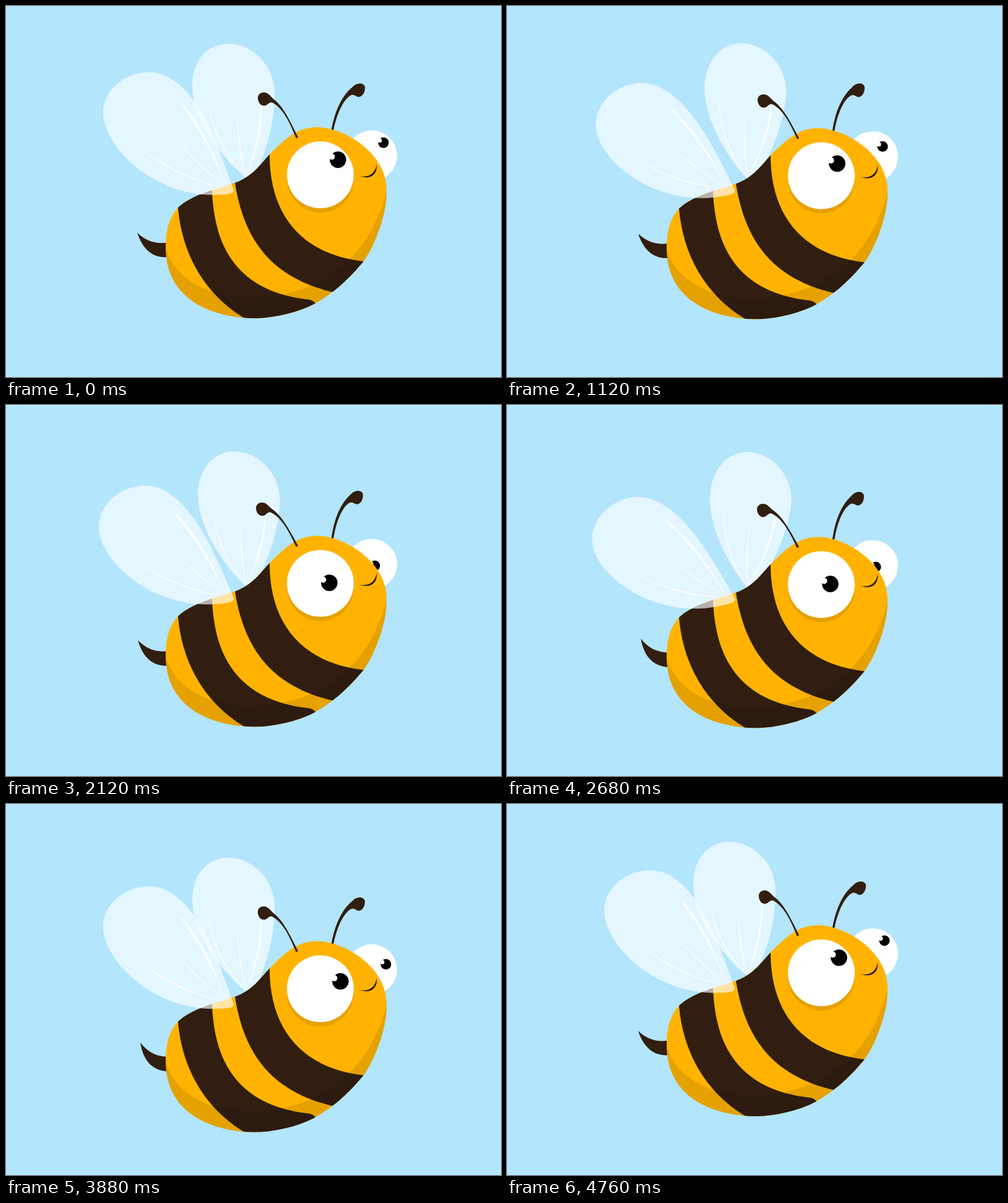
Write an HTML page that moves like this. It is 800x600 px and loops after 4.8 s.

```html
<!DOCTYPE html>
<html lang="en">
<head>
<meta charset="utf-8">
<title>Bee</title>
<style>
  html, body { margin: 0; width: 100%; height: 100%; overflow: hidden; background: #b3e5fc; }
  svg { display: block; }
  .brown { fill: #311e10; }
  .shade { fill: #000; fill-opacity: .1; }
  .dark { fill: #000; fill-opacity: .18; }
  .wing { fill: #fff; fill-opacity: .65; }
  .vein { fill: #fff; fill-opacity: .85; }
</style>
</head>
<body>
<svg width="800" height="600" viewBox="0 0 800 600">
  <defs>
    <path id="shape" d="M503 196C546 196 617 238 615 300C616 340 592 396 577 414C550 446 530 463 500 481C470 497 430 505 400 505C320 503 258 467 258 390C258 362 264 341 278 326C300 306 330 299 370 286C398 276 412 255 426 240C450 216 470 196 503 196Z"/>
    <clipPath id="body"><use href="#shape"/></clipPath>
  </defs>
  <g id="bee">
    <path id="sting" class="brown" d="M212 367C226 380 242 386 262 382V406C240 408 222 397 212 367Z"/>
    <g id="wingR">
      <path class="wing" d="M388 278C353 250 301 185 301 130C301 88 325 61 360 61C402 62 434 100 434 140C434 190 421 235 404 268Q396 278 388 278Z"/>
      <path class="vein" d="M325 152Q337 231 387 275Q341 229 325 152ZM373 170Q374 238 388 275Q379 237 373 170ZM411 163Q412 159 414 163Q414 222 388 275Q409 220 411 163Z"/>
    </g>
    <circle cx="591" cy="242" r="41" fill="#fff"/>
    <g id="pupilR"><circle cx="610" cy="221" r="8.5"/><circle cx="604" cy="217.500" r="3.500" fill="#fff"/></g>

    <use href="#shape" fill="#ffb300"/>
    <g clip-path="url(#body)">
      <path class="brown" d="M370 286C385 380 430 440 530 463L560 470L578 413C480 402 426 340 426 240L400 230Z"/>
      <path class="brown" d="M278 326C284 400 320 465 384 504L400 530L501 482Q497 476 490 475C374 462 336 390 333 297L300 290Z"/>
      <path class="shade" d="M250 385L258 392C275 445 330 471 395 471C500 471 585 415 615 300L640 520H250Z"/>
    </g>
    <circle class="shade" cx="508" cy="280" r="54"/>
    <circle cx="508" cy="273" r="54" fill="#fff"/>
    <g id="pupilL"><circle cx="536.500" cy="248.500" r="13.300"/><circle cx="526.500" cy="243.500" r="5" fill="#fff"/></g>
    <path d="M572 275C588 278 597 270 599 256C601 272 589 281.500 572 275Z" fill="#1f1206"/>

    <g id="wingL">
      <path class="wing" d="M366 292C350 250 310 108 232 107C190 107 157 138 157 172C157 226 235 305 334 305.500C350 305 368 306 368 298Z"/>
      <path class="vein" d="M282 159Q283 156 286 158Q328 209 356 293Q322 210 282 159ZM270 212Q312 261 356 293Q314 257 270 212ZM212 226Q276 281 356 294Q280 277 212 226Z"/>
    </g>
    <path id="feelerL" class="brown" d="M469 214C459 189 447 164 430 156C424 155 424 160 418 161C411 162 407 155 407 148C408 140 416 138 422 141C427 144 429 148 433 151C449 163 461 190 472 212Z"/>
    <path id="feelerR" class="brown" d="M526 200C530 177 540 147 560 131C566 124 577 123 580 130C581 138 577 146 571 147C565 147 564 142 558 144C544 151 533.500 179 529.500 200Z"/>
  </g>
</svg>
<script>
const LOOP = 4800, STEP = 40;
const wave = x => (1 - Math.cos(2 * Math.PI * x)) / 2;
const ease = (t, from, to) => wave(Math.min(1, Math.max(0, (t - from) / (to - from))) / 2);

const put = (id, value) => document.getElementById(id).setAttribute('transform', value);
const turn = (id, angle, x, y) => put(id, `rotate(${angle} ${x} ${y})`);

function draw(now) {
  const t = Math.floor(now % LOOP / STEP) * STEP;
  const u = t / LOOP;

  // Four hovers per loop, the third one a little hurried.
  const hover = 4 * u + .1 * Math.max(0, -Math.sin(2 * Math.PI * (u - .03)));
  put('bee', `translate(0 ${34.6 * wave(hover)})`);
  // The sting rises faster than it sinks.
  turn('sting', 9.5 * wave((hover % 1) ** .7), 258, 394);

  const flap = 11.4 * wave(22 * t / (LOOP - STEP) + .11 * wave(2 * u));
  turn('wingL', -flap, 355, 294);
  turn('wingR', flap, 388, 281);

  const sway = -7.4 * wave(5 * u);
  turn('feelerL', sway, 470, 213);
  turn('feelerR', sway, 528, 200);

  // Look down, then ahead, then back up.
  const down = ease(t, 1000, 1400), up = ease(t, 4360, 4740);
  const x = -14 * down + 18 * ease(t, 3050, 3600) - 4 * up;
  const y = 23.5 * down - 11 * ease(t, 3250, 3800) - 12.5 * up;
  for (const id of ['pupilL', 'pupilR']) put(id, `translate(${x} ${y})`);

  requestAnimationFrame(() => draw(performance.now() - start));
}
const start = performance.now();
draw(0);
</script>
</body>
</html>
```
